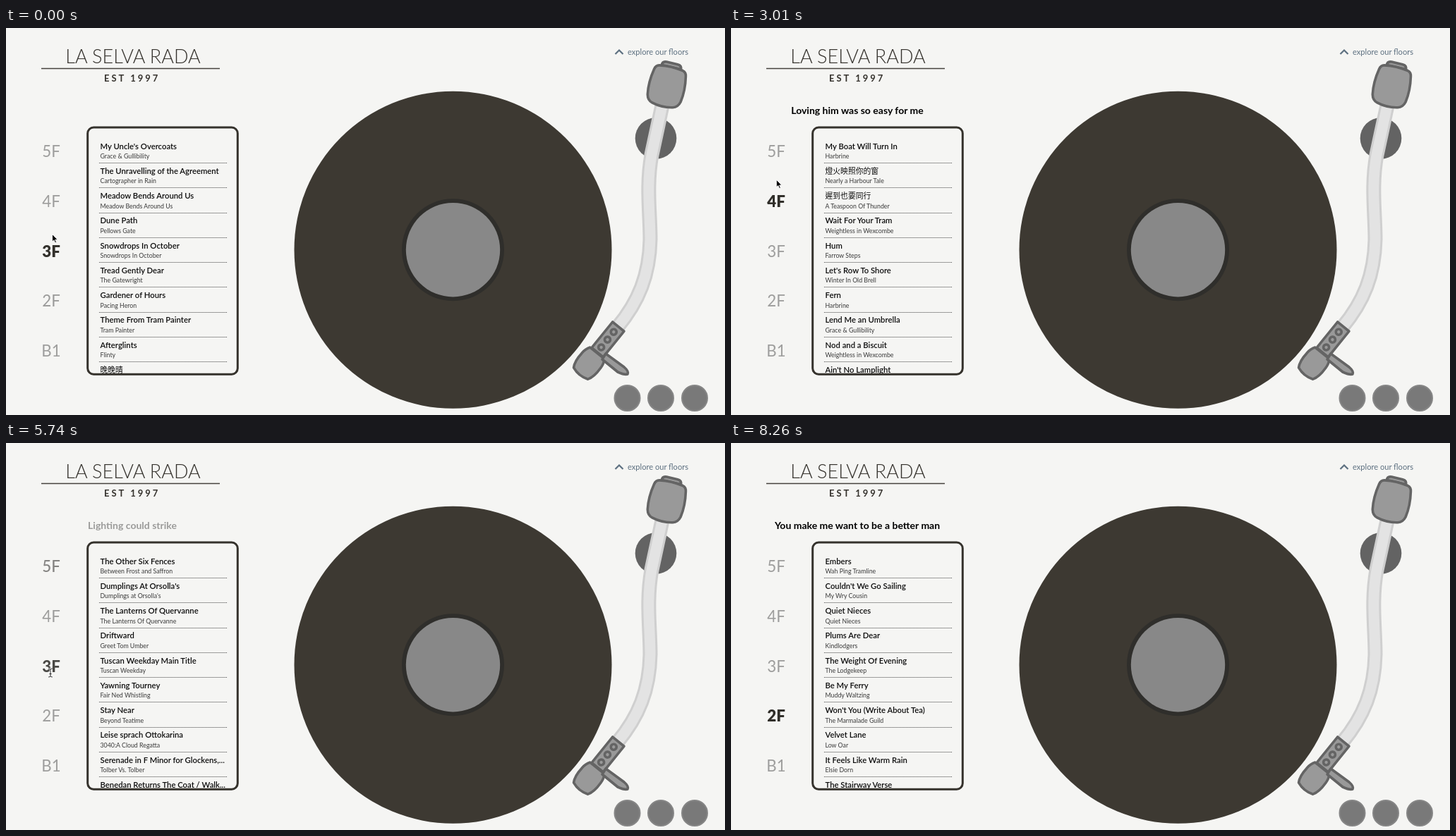
Animation of 1019 by 549 pixels, one loop 8680 ms. Source, as an HTML page:

```html
<!DOCTYPE html>
<html lang="en">
<head>
<meta charset="utf-8">
<title>Turntable floors</title>
<style>
  html, body { margin: 0; width: 100%; height: 100%; overflow: hidden; background: #f5f5f3; }
  svg { display: block; width: 100%; height: 100%; font-family: Lato, "Open Sans", "Noto Sans CJK TC", "Noto Sans CJK", sans-serif; }
  .name { font-size: 27px; font-weight: 300; fill: #35322d; }
  .est { font-size: 13px; font-weight: 700; letter-spacing: 3px; fill: #35322d; }
  .explore { font-size: 11.1px; fill: #5d7080; }
  .quote { font-size: 14px; font-weight: 700; text-anchor: middle; }
  .floor { font-size: 22.3px; text-anchor: middle; }
  .song { font-size: 11.3px; font-weight: 600; fill: #0c0c0c; }
  .cjk { font-size: 10.8px; font-weight: 500; }
  .film { font-size: 8.8px; fill: #3a3a3a; }
  .metal { fill: #999; stroke: #646464; stroke-width: 3.6; stroke-linejoin: round; }
  .arm { fill: none; stroke: #cfcfcf; stroke-width: 21; }
  .arm.inner { stroke: #e3e3e3; stroke-width: 15; }
</style>
</head>
<body>
<svg id="stage" viewBox="0 0 1019 549">
  <defs><clipPath id="panel"><rect x="117" y="142" width="210" height="348"/></clipPath></defs>

  <text class="name" x="180" y="50" text-anchor="middle">LA SELVA RADA</text>
  <path d="M50 57.5H303" stroke="#45423d" stroke-width="1.3"/>
  <text class="est" x="139" y="75.5">EST 1997</text>
  <path d="M863.5 37L869 31.5L874.5 37" fill="none" stroke="#5d7080" stroke-width="2.2"/>
  <text class="explore" x="881" y="38">explore our floors</text>

  <circle cx="633.5" cy="314.7" r="225" fill="#3d3932"/>
  <circle cx="633.5" cy="314.7" r="72.5" fill="#2f2e2b"/>
  <circle cx="633.5" cy="314.7" r="66.7" fill="#888"/>

  <circle cx="921" cy="156.5" r="29.3" fill="#636363"/>
  <path class="arm" d="M930 110L915 180C907 225 913 262 913 300C912 350 897 388 866 425"/>
  <path class="arm inner" d="M930 110L915 180C907 225 913 262 913 300C912 350 897 388 866 425"/>
  <g class="metal" transform="translate(936.5 83) rotate(13)">
    <path d="M-14-28Q-14-34-8-34H8Q14-34 14-28Z"/>
    <path d="M-17-27Q0-30 17-27Q22-26 23-20Q27 0 24 17Q22 25 15 27Q0 31-15 27Q-22 25-24 17Q-27 0-23-20Q-22-26-17-27Z"/>
  </g>
  <g class="metal" transform="translate(826 476) rotate(39)">
    <path d="M-13-19Q-17-13-17-5Q-18 10-13 18Q0 23 13 18Q18 10 17-5Q17-13 13-19Z"/>
    <rect x="-11" y="-67" width="21" height="47"/>
    <circle cx="-.8" cy="-57" r="4"/><circle cx="-.8" cy="-43" r="4"/><circle cx="-.8" cy="-29" r="4"/>
  </g>
  <path class="metal" d="M850 462L876 481Q883 487 881 491Q877 492.5 867 488L845 470Z"/>
  <g fill="#797979" stroke="#868686" stroke-width="2">
    <circle cx="880.5" cy="525" r="18"/><circle cx="928" cy="525" r="18"/><circle cx="976" cy="525" r="18"/>
  </g>

  <text class="quote" id="quote" x="179" y="121.5"></text>
  <g id="floors"></g>
  <g id="lists" clip-path="url(#panel)"></g>
  <rect x="115.7" y="141" width="212.6" height="350.3" rx="8.5" fill="none" stroke="#35322c" stroke-width="3"/>

  <g id="cursor">
    <path id="arrow" d="M0 0V10.6L2.5 8.4L4.2 12.4L6 11.6L4.3 7.8H7.6Z" fill="#000" stroke="#fff" stroke-width=".9"/>
    <g id="beam" fill="none">
      <path d="M-2.8-6Q0-6 0-4.5Q0-6 2.8-6M0-4.5V4.5M-2.8 6Q0 6 0 4.5Q0 6 2.8 6M-1.5 1.5H1.5" stroke="#fff" stroke-width="2.4"/>
      <path d="M-2.8-6Q0-6 0-4.5Q0-6 2.8-6M0-4.5V4.5M-2.8 6Q0 6 0 4.5Q0 6 2.8 6M-1.5 1.5H1.5" stroke="#222" stroke-width="1"/>
    </g>
  </g>
</svg>
<script>
const LOOP = 8680, ROW = 35.25, FADE = 400, WEIGHT_TIME = 500, SWAP_DELAY = 270;
const FLOORS = ['5F', '4F', '3F', '2F', 'B1'];
const floorY = i => 175 + 70.75 * i;

// One list per floor; each entry is "song~film".
const SONGS = [
  `The Other Six Fences~Between Frost and Saffron
Dumplings At Orsolla's~Dumplings at Orsolla's
The Lanterns Of Quervanne~The Lanterns Of Quervanne
Driftward~Greet Tom Umber
Tuscan Weekday Main Title~Tuscan Weekday
Yawning Tourney~Fair Ned Whistling
Stay Near~Beyond Teatime
Leise sprach Ottokarina~3040:A Cloud Regatta
Serenade in F Minor for Glockens,...~Tolber Vs. Tolber
Benedan Returns The Coat / Walk...~`,
  `My Boat Will Turn In~Harbrine
燈火映照你的窗~Nearly a Harbour Tale
遲到也要同行~A Teaspoon Of Thunder
Wait For Your Tram~Weightless in Wexcombe
Hum~Farrow Steps
Let's Row To Shore~Winter In Old Brell
Fern~Harbrine
Lend Me an Umbrella~Grace & Gullibility
Nod and a Biscuit~Weightless in Wexcombe
Ain't No Lamplight~`,
  `My Uncle's Overcoats~Grace & Gullibility
The Unravelling of the Agreement~Cartographer in Rain
Meadow Bends Around Us~Meadow Bends Around Us
Dune Path~Pellows Gate
Snowdrops In October~Snowdrops In October
Tread Gently Dear~The Gatewright
Gardener of Hours~Pacing Heron
Theme From Tram Painter~Tram Painter
Afterglints~Flinty
晚晚晴~`,
  `Embers~Wah Ping Tramline
Couldn't We Go Sailing~My Wry Cousin
Quiet Nieces~Quiet Nieces
Plums Are Dear~Kindlodgers
The Weight Of Evening~The Lodgekeep
Be My Ferry~Muddy Waltzing
Won't You (Write About Tea)~The Marmalade Guild
Velvet Lane~Low Oar
It Feels Like Warm Rain~Elsie Dorn
The Stairway Verse~`
];

// [time, floor chosen]
const CLICKS = [[-400, 2], [1656, 1], [3610, 0], [5506, 2], [7045, 3]];
const STARTING_FLOOR = 3;

// [text, fade-in start, fade-out start]
const QUOTES = [
  ['To make each day count', 130, 1656],
  ['Loving him was so easy for me', 2260, 3610],
  ['Lighting could strike', 4104, 5506],
  ['To make each day count', 6140, 7045],
  ['You make me want to be a better man', 7660, Infinity]
];

// [time, x, y]
const POINTER = [
  [0, 65.5, 292.5], [60, 65.5, 292.5], [630, 68, 244], [700, 68, 244], [770, 67, 245], [910, 67, 245], [980, 66.5, 246],
  [1050, 66.5, 246], [1190, 65.5, 247.5], [2820, 65.5, 247.5], [3220, 63, 178], [3290, 63, 178],
  [3360, 62.5, 178], [4310, 62.5, 178], [4970, 61, 316], [5320, 63, 326], [6150, 63, 326],
  [6580, 63, 378], [7330, 63, 378], [7910, 480, 523], [8060, 494, 540], [8250, 497, 556]
];

const $ = id => document.getElementById(id);
const clamp = v => Math.min(1, Math.max(0, v));
const mix = (a, b, p) => a + (b - a) * p;
const swing = u => (1 - Math.cos(Math.PI * clamp(u))) / 2;

// CSS "ease" curve, solved by bisection.
function ease(u) {
  if (u <= 0 || u >= 1) return clamp(u);
  const bezier = (a, b, s) => 3 * a * s * (1 - s) ** 2 + 3 * b * s * s * (1 - s) + s ** 3;
  let lo = 0, hi = 1;
  for (let i = 0; i < 20; i++) {
    const mid = (lo + hi) / 2;
    if (bezier(.25, .25, mid) < u) lo = mid; else hi = mid;
  }
  return bezier(.1, 1, lo);
}

function add(parent, tag, attrs, text = '') {
  const el = document.createElementNS('http://www.w3.org/2000/svg', tag);
  for (const key in attrs) el.setAttribute(key, attrs[key]);
  el.textContent = text;
  return parent.appendChild(el);
}

const labels = FLOORS.map((name, i) =>
  add($('floors'), 'text', { class: 'floor', x: 64, y: floorY(i) + 8 }, name));

for (let i = 0; i < 9; i++) {
  add($('lists'), 'path', { d: `M132 ${191.5 + Math.round(ROW * i)}H313`, stroke: '#444', 'stroke-dasharray': '1 1' });
}

const lists = SONGS.map(block => {
  const group = add($('lists'), 'g', {});
  block.split('\n').forEach((line, i) => {
    const [song, film] = line.split('~');
    const cjk = /[\u4e00-\u9fff]/.test(song) ? ' cjk' : '';
    add(group, 'text', { class: 'song' + cjk, x: 133.5, y: 171.6 + ROW * i }, song);
    add(group, 'text', { class: 'film', x: 133.5, y: 185 + ROW * i }, film);
  });
  return group;
});

function drawFloors(t) {
  const k = CLICKS.findLastIndex(c => c[0] <= t);
  const [start, current] = CLICKS[k];
  const previous = k ? CLICKS[k - 1][1] : STARTING_FLOOR;
  const p = ease((t - start) / WEIGHT_TIME);
  labels.forEach((label, i) => {
    const on = i === current ? p : i === previous ? 1 - p : 0;
    const [r, g, b] = [[158, 48], [158, 46], [157, 41]].map(([off, lit]) => Math.round(mix(off, lit, on)));
    label.style.fill = `rgb(${r},${g},${b})`;
    label.style.fontWeight = Math.round(mix(400, 900, on));
  });
  const shown = t >= start + SWAP_DELAY ? current : previous;
  lists.forEach((list, i) => { list.style.display = i === shown ? '' : 'none'; });
}

function drawQuote(t) {
  const quote = QUOTES.findLast(q => q[1] <= t);
  $('quote').textContent = quote ? quote[0] : '';
  if (quote) $('quote').style.opacity = swing((t - quote[1]) / FADE) * (1 - swing((t - quote[2]) / FADE));
}

function drawPointer(t) {
  const next = POINTER.findIndex(k => k[0] > t);
  $('cursor').style.display = next < 0 ? 'none' : '';
  if (next < 0) return;
  const [t0, x0, y0] = POINTER[next - 1], [t1, x1, y1] = POINTER[next];
  const p = swing((t - t0) / (t1 - t0));
  const x = mix(x0, x1, p), y = mix(y0, y1, p);
  const overLabel = x > 50 && x < 78 && FLOORS.some((_, i) => Math.abs(y - floorY(i)) < 14);
  $('cursor').setAttribute('transform', `translate(${x} ${y})`);
  $('beam').style.display = overLabel ? '' : 'none';
  $('arrow').style.display = overLabel ? 'none' : '';
}

const began = performance.now();
function frame() {
  const t = (performance.now() - began) % LOOP;
  drawFloors(t);
  drawQuote(t);
  drawPointer(t);
  requestAnimationFrame(frame);
}
frame();
</script>
</body>
</html>
```
